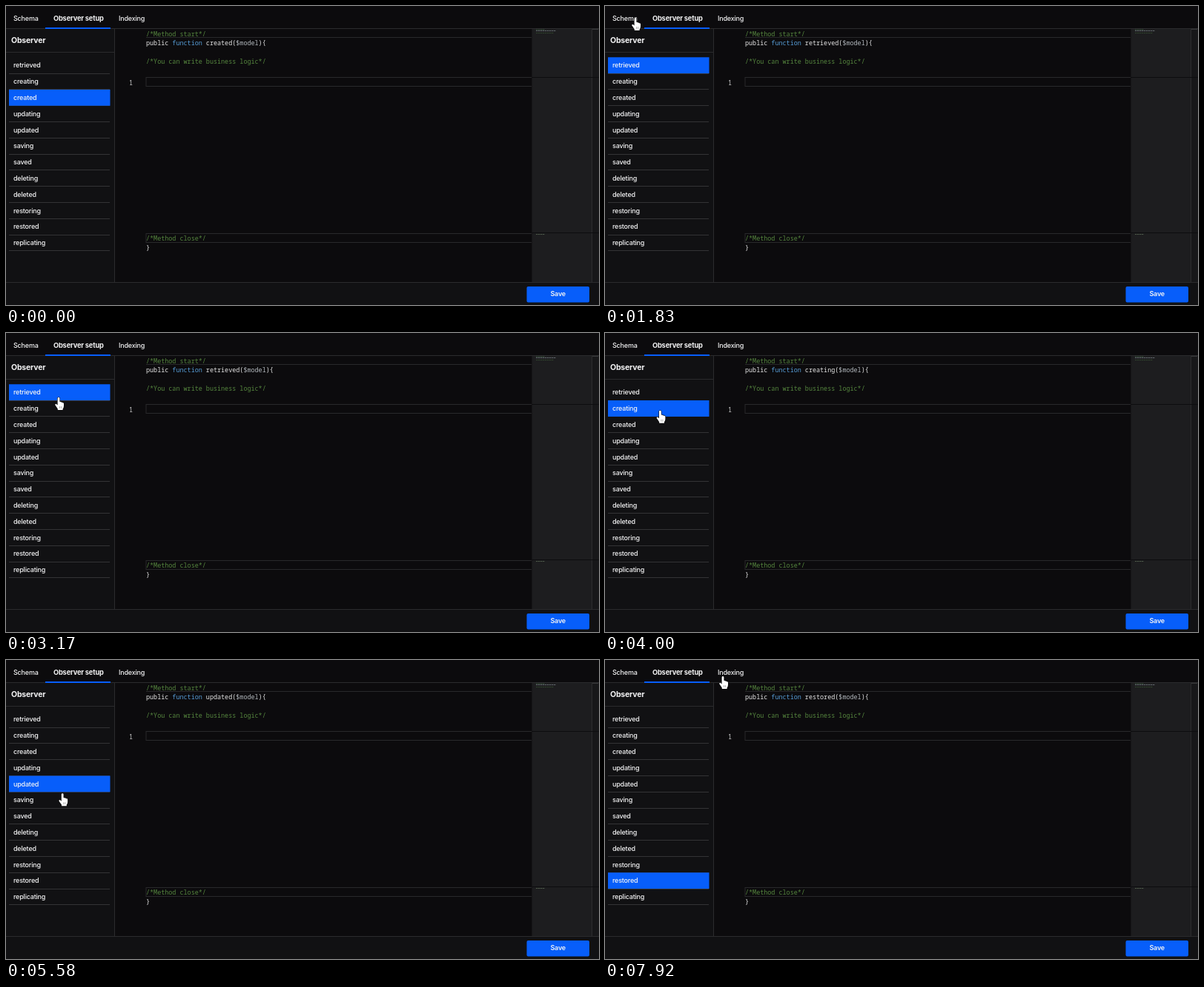
These frames come from a looping animation (800x404 px, 8 s). An HTML page with a canvas:

```html
<!DOCTYPE html>
<html lang="en">
<head>
<meta charset="utf-8">
<title>Observer setup</title>
<style>
html, body { margin: 0; width: 100%; height: 100%; overflow: hidden; background: #0c0b0d; }
canvas { display: block; width: 800px; height: 404px; }
</style>
</head>
<body>
<canvas id="stage"></canvas>
<script>
const LOOP = 8000, FPS = 12;
const BLUE = '#075efa', WHITE = '#f4f4f5', LINE = '#2b2b2d', PANEL = '#111113', PAGE = '#0c0b0d';
const SANS = 'Inter, "Open Sans", sans-serif';
const MONO = '"Noto Sans Mono", "DejaVu Sans Mono", monospace';

const canvas = document.getElementById('stage');
const ctx = canvas.getContext('2d');
const ratio = window.devicePixelRatio || 1;
canvas.width = 800 * ratio;
canvas.height = 404 * ratio;

const EVENTS = ['retrieved', 'creating', 'created', 'updating', 'updated', 'saving',
  'saved', 'deleting', 'deleted', 'restoring', 'restored', 'replicating'];

// Time of each click and the row it selects
const PICKS = [[0, 'created'], [1250, 'retrieved'], [3750, 'creating'], [4330, 'created'],
  [4920, 'updating'], [5330, 'updated'], [5670, 'saving'], [6000, 'saved'], [7170, 'restored']];
const SCHEMA_OPEN = 1920, SCHEMA_CLOSE = 2660;

// Pointer stops: time, x, y of the fingertip
const STOPS = [[80, 96, 412], [750, 84, 300], [920, 84, 300], [1250, 60, 78], [1400, 58, 76],
  [1830, 41, 16], [2000, 40, 15], [2500, 94, 18], [2660, 94, 18], [3170, 71, 87],
  [3330, 70, 92], [3580, 70, 92], [3750, 72, 96], [4330, 78, 118], [4500, 78, 120],
  [4750, 79, 146], [4920, 79, 149], [5330, 77, 162], [5670, 76, 184], [6000, 75, 206],
  [6250, 75, 208], [6670, 74, 302], [6750, 74, 300], [6920, 74, 300], [7330, 73, 294],
  [7920, 159, 22]];

// name, type, default kind, relation
const FIELDS = [
  ['id', 'Unsigned...', 'input', 'Add relation'],
  ['title', 'REAL', 'input', ''],
  ['description', 'STRING', 'null', 'Edit relation - User'],
  ['attachments', 'STRING', 'select', 'Edit relation - User'],
  ['status', 'INTEGER', 'input', 'Add relation'],
  ['date', 'DATETIME', 'select', ''],
  ['due_date', 'DATETIME', 'select', ''],
  ['completed_by', 'INTEGER', 'input', 'Edit relation - User'],
  ['completed_at', 'DATETIME', 'select', '']
];

function box(x, y, w, h, color, radius = 0) {
  ctx.fillStyle = color;
  ctx.beginPath();
  ctx.roundRect(x, y, w, h, radius);
  ctx.fill();
}

function path(points, color, width = 1) {
  ctx.strokeStyle = color;
  ctx.lineWidth = width;
  ctx.beginPath();
  points.forEach(([x, y], i) => i ? ctx.lineTo(x, y) : ctx.moveTo(x, y));
  ctx.stroke();
}

function ring(x, y, r, color, width = 0.9) {
  ctx.strokeStyle = color;
  ctx.lineWidth = width;
  ctx.beginPath();
  ctx.arc(x, y, r, 0, Math.PI * 2);
  ctx.stroke();
}

// Draws text centred on y and returns its width
function label(str, x, y, { size = 9, weight = 500, color = WHITE, align = 'left' } = {}) {
  ctx.font = `${weight} ${size}px ${SANS}`;
  ctx.letterSpacing = '-0.2px';
  ctx.textAlign = align;
  ctx.fillStyle = color;
  ctx.fillText(str, x, y + size * 0.36);
  return ctx.measureText(str).width;
}

function code(str, x, y, color) {
  ctx.font = `500 8.43px ${MONO}`;
  ctx.letterSpacing = '0px';
  ctx.textAlign = 'left';
  ctx.fillStyle = color;
  ctx.fillText(str, x, y + 3);
  return x + ctx.measureText(str).width;
}

function cross(x, y, r, color) {
  path([[x - r, y - r], [x + r, y + r]], color, 1.2);
  path([[x - r, y + r], [x + r, y - r]], color, 1.2);
}

function plus(x, y, r, color, width) {
  path([[x - r, y], [x + r, y]], color, width);
  path([[x, y - r], [x, y + r]], color, width);
}

function info(x, y) {
  ring(x, y, 3.7, '#d5d5d6', 0.8);
  box(x - 0.45, y - 2, 0.9, 0.9, '#d5d5d6');
  box(x - 0.45, y - 0.5, 0.9, 2.5, '#d5d5d6');
}

function tabs(schema) {
  const on = { size: 9.3, weight: 700 };
  label('Schema', 10, 16.5, schema ? on : {});
  label('Observer setup', schema ? 66 : 64, 16.5, schema ? {} : on);
  label('Indexing', schema ? 150 : 152, 16.5);
  box(0, 30, 800, 1, LINE);
  if (schema) box(0, 29, 55, 2, BLUE);
  else box(53, 29, 88, 2, BLUE);
}

function footer() {
  box(0, 373, 800, 31, PANEL);
  box(0, 373, 800, 1, LINE);
  box(702.5, 379, 84.5, 21.5, BLUE, 2);
  label('Save', 744.7, 389, { weight: 600, align: 'center' });
}

function minimap() {
  box(709.5, 31, 81, 342, '#1d1d1f');
  box(790.5, 31, 9.5, 342, '#171719');
  box(790, 31, 1, 342, '#2c2c2e');
  box(791, 30.5, 8, 1, '#5a5a5c');
  for (const y of [96, 306]) box(709.5, y, 90.5, 1, '#0d0d0f');
  const dashes = (y, end, color) => {
    for (let x = 715; x < end; x += 3) box(x, y, 2.4, 0.9, color);
  };
  dashes(31.5, 727, '#39543a');
  dashes(33, 741, '#6b7378');
  dashes(36, 738, '#34492f');
  dashes(308, 727, '#53604f');
}

function observer(picked) {
  box(0, 31, 146, 342, PANEL);
  box(146, 31, 1, 342, LINE);
  label('Observer', 7, 46.5, { size: 10.5, weight: 700 });
  box(0, 62, 146, 1, LINE);
  EVENTS.forEach((name, i) => {
    const y = 69.3 + 21.8 * i;
    box(4, Math.round(y + 21.2), 136, 1, '#333335');
    if (name === picked) box(4, y, 136.5, 21.8, BLUE);
    label(name, 10, y + 10.9);
  });

  for (const y of [42, 96, 108, 307, 319]) box(189, y, 520, 1, '#29292b');
  for (const y of [96, 307]) box(188.5, y, 1, 13, '#29292b');
  minimap();

  const green = '#56873f';
  code('/*Method start*/', 189, 37.5, green);
  let x = code('public ', 189, 50, '#e6e6e6');
  x = code('function ', x, 50, '#569cd6');
  x = code(picked + '(', x, 50, '#e6e6e6');
  x = code('$model', x, 50, '#b3b9be');
  code('){', x, 50, '#e6e6e6');
  code('/*You can write business logic*/', 189, 75, green);
  code('1', 166, 103.5, '#d0d0d0');
  code('/*Method close*/', 189, 314, green);
  code('}', 189, 327, '#e6e6e6');
}

function option(x, text, checked) {
  box(x, 11, 10, 10, checked ? BLUE : '#434345', 1.5);
  if (checked) path([[x + 2.5, 16], [x + 4.4, 18], [x + 7.7, 13.8]], WHITE, 1.2);
  label(text, x + 15.5, 16.3, { size: 9.1, weight: 600 });
}

function selectMark(x, y, color) {
  box(x + 61, y - 3.5, 0.9, 7, color);
  path([[x + 69, y - 1.5], [x + 72.5, y + 2], [x + 76, y - 1.5]], color, 1.4);
}

function gear(x, y) {
  ctx.strokeStyle = '#dedede';
  ctx.lineWidth = 1;
  ctx.beginPath();
  for (let i = 0; i <= 48; i++) {
    const a = i / 48 * Math.PI * 2;
    const r = 4 + 0.5 * Math.cos(a * 6);
    ctx.lineTo(x + r * Math.sin(a), y - r * Math.cos(a));
  }
  ctx.stroke();
  ring(x, y, 1.4, '#dedede');
}

function advance(y) {
  box(582, y - 10.3, 69.5, 20.8, '#212123', 2);
  gear(596, y + 0.3);
  label('Advance', 606, y);
}

function fieldRow([name, type, kind, relation], i) {
  const y = 73.3 + 34.25 * i, mid = y + 3.2;
  const dim = i === 0;
  const fill = dim ? '#29292b' : '#3c3c3e';
  const ink = dim ? '#77777a' : WHITE;
  const soft = dim ? '#77777a' : '#a2a2a5';
  const small = { size: 7.8, color: ink };

  for (let k = 0; k < 6; k++) {
    box(8.9 + (k % 2) * 3.6, y - 4.3 + (k >> 1) * 3.5, 1.6, 1.6, '#bcbcbe', 0.8);
  }
  cross(25, y + 0.2, 3, dim ? '#5c5c5f' : WHITE);

  for (const x of [52, 143, 397]) box(x, mid - 9.3, 84, 18.8, fill, 1.5);
  label(name, 58, mid, small);
  label(type, 151, mid, { ...small, weight: 600 });
  selectMark(143, mid + 0.5, ink);
  label('-', 235, y + 2, { weight: 700 });

  if (kind === 'input') {
    label('Default value', 403, mid, { size: 7.8, weight: 400, color: soft });
  } else {
    const empty = kind === 'select';
    label(empty ? 'Default' : 'Null', 404, mid - 0.5, { size: 7.8, color: empty ? soft : WHITE });
    if (!empty) cross(446, mid, 2.6, WHITE);
    selectMark(397, mid, WHITE);
  }

  if (relation) {
    const tint = dim ? '#828285' : WHITE;
    ring(496, y + 0.2, 5, tint);
    plus(496, y + 0.2, 2.6, tint, 0.9);
    const w = label(relation, 506.5, y - 0.2, { size: 7.8, color: tint });
    box(506.5, y + 3.8, w, 0.8, tint);
  } else {
    label('-', 488, y + 1, { weight: 700 });
  }
  advance(y);
  box(0, Math.round(y + 17), 797, 1, '#222224');
}

function schemaView() {
  option(556, 'Moderators', true);
  info(628, 16);
  option(640, 'Timestamps', true);
  info(714.5, 16);
  option(727, 'Softdelete', false);

  box(0, 31, 800, 25, PANEL);
  box(0, 56, 800, 1, '#222224');
  box(7, 35, 16, 15.5, BLUE, 1.5);
  plus(15, 42.7, 3, WHITE, 1.3);
  [['Attributes', 52], ['Data type', 144], ['Value', 235], ['Default', 397],
    ['Relation', 488], ['Advance', 581]].forEach(([text, x]) => label(text, x, 42.5));
  info(193, 43);

  FIELDS.forEach(fieldRow);
  advance(73.3 + 34.25 * 9);
  box(797, 57, 3, 196, '#57575a', 1.5);
}

function pointerAt(t) {
  if (t < STOPS[0][0]) return null;
  const next = STOPS.findIndex(s => s[0] > t);
  if (next < 0) return STOPS[STOPS.length - 1].slice(1);
  const [t0, x0, y0] = STOPS[next - 1], [t1, x1, y1] = STOPS[next];
  const u = (t - t0) / (t1 - t0), e = u * u * (3 - 2 * u);
  return [x0 + (x1 - x0) * e, y0 + (y1 - y0) * e];
}

function hand([x, y]) {
  ctx.save();
  ctx.translate(x, y);
  const shape = new Path2D('M-1.4 1.4Q-1.4 0 0 0Q1.4 0 1.4 1.4V6Q2.6 5.4 3.4 6.6' +
    'Q4.6 6 5.3 7.2Q7 6.8 7 8.6V11.6Q7 14 5.6 15.4V17H-1.2V15.4Q-2.6 13.4 -4.6 10.6' +
    'Q-5.2 8.8 -3.6 8.8Q-2.4 9.2 -1.4 10.6Z');
  ctx.lineJoin = 'round';
  ctx.lineWidth = 1.2;
  ctx.strokeStyle = '#0a0a0a';
  ctx.stroke(shape);
  ctx.fillStyle = '#fff';
  ctx.fill(shape);
  path([[1.5, 12], [1.5, 15]], '#777', 0.6);
  path([[3.6, 12], [3.6, 15]], '#777', 0.6);
  ctx.restore();
}

function draw(t) {
  ctx.setTransform(ratio, 0, 0, ratio, 0, 0);
  box(0, 0, 800, 404, PAGE);
  const schema = t >= SCHEMA_OPEN && t < SCHEMA_CLOSE;
  if (schema) schemaView();
  else observer(PICKS.filter(p => p[0] <= t).pop()[1]);
  tabs(schema);
  footer();
  const tip = pointerAt(t);
  if (tip) hand(tip);
}

function tick() {
  const now = performance.now() % LOOP;
  const step = Math.floor((now + 4) * FPS / 1000) % (LOOP * FPS / 1000);
  draw(Math.round(step * 100 / FPS) * 10);
  requestAnimationFrame(tick);
}
tick();
</script>
</body>
</html>
```
